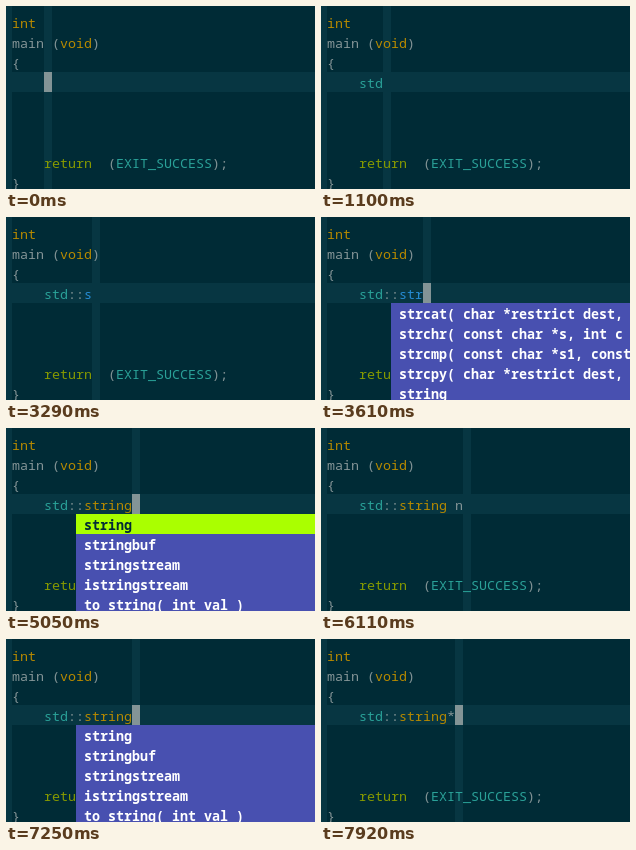
Recreate the animation shown at these times as an HTML page with a canvas. Size 309 by 183 pixels, loop 8 s.

```html
<!DOCTYPE html>
<html lang="en">
<head>
<meta charset="utf-8">
<title>Code completion</title>
<style>
html, body { margin: 0; width: 100%; height: 100%; overflow: hidden; background: #002b36; }
canvas { display: block; }
</style>
</head>
<body>
<canvas id="stage" width="309" height="183"></canvas>
<script>
const ctx = document.getElementById('stage').getContext('2d', { alpha: false });
const W = 309, H = 183, LOOP = 8000;
const LEFT = 6, TOP = 6, CELL = 8, ROW = 20, BASE = 16;
const EDIT_ROW = 3, INDENT = 4;

const C = {
  bg: '#002b36', line: '#073642', text: '#839496', type: '#b58900',
  keyword: '#859900', name: '#2aa198', func: '#268bd2',
  menu: '#4850b0', menuText: '#ffffff', pick: '#aaff00', pickText: '#002b36'
};
const FONT = '13.333px "Noto Sans Mono", monospace';

const MENUS = {
  s: ['string', 'size_t', 'sort', 'set', 'stack'],
  st: ['student_t_distribution', 'string', 'static_cast', 'stack', 'strcat'],
  std: ['student_t_distribution', 'std', 'steady_clock',
    'scoped_allocator_adaptor', 'is_trivially_destructible'],
  stds: ['student_t_distribution', 'is_trivially_destructible',
    'is_trivially_default_constructible', 'is_nothrow_destructible',
    'is_trivially_constructible'],
  str: ['strcat( char *restrict dest, const char *restrict src )',
    'strchr( const char *s, int c )', 'strcmp( const char *s1, const char *s2 )',
    'strcpy( char *restrict dest, const char *restrict src )', 'string'],
  string: ['string', 'stringbuf', 'stringstream', 'istringstream', 'to_string( int val )'],
  n: ['namespace', 'new', 'noexcept', 'nullptr', 'not_equal_to']
};

const plain = s => [[s, C.text]];
const std = [['std', C.name]];
const scope = [...std, ['::', C.text]];
const member = (s, color = C.func) => [...scope, [s, color]];
const str = (tail = '') => [...member('string', C.type), [tail, C.text]];

// Each step: start time, typed text, and any completion menu.
const STEPS = [
  { at: 0, code: [] },
  { at: 440, code: plain('s'), hide: true },
  { at: 480, code: plain('s'), menu: 's', col: 3 },
  { at: 810, code: plain('st'), menu: 's', col: 3, hide: true },
  { at: 850, code: plain('st'), menu: 'st', col: 3 },
  { at: 1100, code: std, hide: true },
  { at: 1150, code: std, menu: 'std', col: 3 },
  { at: 2320, code: [['st', C.name], ['ds', C.text]], menu: 'std', col: 3, hide: true },
  { at: 2360, code: plain('stds'), menu: 'stds', col: 3 },
  { at: 2630, code: std, hide: true },
  { at: 2690, code: [...std, [':', C.text]] },
  { at: 2750, code: scope },
  { at: 3290, code: member('s'), hide: true },
  { at: 3370, code: member('s') },
  { at: 3450, code: member('st') },
  { at: 3530, code: member('str'), hide: true },
  { at: 3610, code: member('str'), menu: 'str', col: 8 },
  { at: 3820, code: member('stri'), menu: 'str', col: 8, hide: true },
  { at: 3900, code: member('stri'), menu: 'string', col: 8 },
  { at: 3980, code: member('strin'), menu: 'string', col: 8 },
  { at: 4060, code: str(), menu: 'string', col: 8 },
  { at: 5050, code: str(), menu: 'string', col: 8, pick: 0 },
  { at: 5490, code: str(' ') },
  { at: 6110, code: str(' n'), hide: true },
  { at: 6220, code: str(' n'), menu: 'n', col: 15 },
  { at: 6770, code: str(' n '), hide: true },
  { at: 6810, code: str(' n ') },
  { at: 6930, code: str(' n') },
  { at: 7090, code: str(' ') },
  { at: 7250, code: str(), menu: 'string', col: 8 },
  { at: 7920, code: str('*') }
];

const colX = col => LEFT + col * CELL;
const rowY = row => TOP + row * ROW;

function box(x, y, w, h, color) {
  ctx.fillStyle = color;
  ctx.fillRect(x, y, w, h);
}

// Draws coloured runs and returns the column after the last one.
function write(row, col, runs) {
  for (const [text, color] of runs) {
    ctx.fillStyle = color;
    ctx.fillText(text, colX(col), rowY(row) + BASE);
    col += text.length;
  }
  return col;
}

function drawMenu({ menu, col, pick }) {
  const x = colX(col);
  ctx.font = 'bold ' + FONT;
  MENUS[menu].forEach((item, i) => {
    const row = EDIT_ROW + 1 + i, on = i === pick;
    box(x, rowY(row), W - x, ROW, on ? C.pick : C.menu);
    write(row, col + 1, [[item, on ? C.pickText : C.menuText]]);
  });
}

function draw(step) {
  const length = step.code.reduce((n, [text]) => n + text.length, 0);
  const cursorX = colX(INDENT + length);
  box(0, 0, W, H, C.bg);
  box(0, 0, LEFT, H, C.line);
  box(cursorX, 0, CELL, H, C.line);
  box(0, rowY(EDIT_ROW), W, ROW, C.line);

  ctx.font = FONT;
  write(0, 0, [['int', C.type]]);
  write(1, 0, [['main (', C.text], ['void', C.type], [')', C.text]]);
  write(2, 0, plain('{'));
  write(EDIT_ROW, INDENT, step.code);
  write(7, INDENT, [['return', C.keyword], ['  (', C.text],
    ['EXIT_SUCCESS', C.name], [');', C.text]]);
  write(8, 0, plain('}'));

  if (!step.hide) box(cursorX, rowY(EDIT_ROW), CELL, ROW, C.text);
  if (step.menu) drawMenu(step);
}

const start = performance.now();
function tick() {
  const t = (performance.now() - start) % LOOP;
  draw(STEPS.findLast(step => step.at <= t));
  requestAnimationFrame(tick);
}
tick();
</script>
</body>
</html>
```
